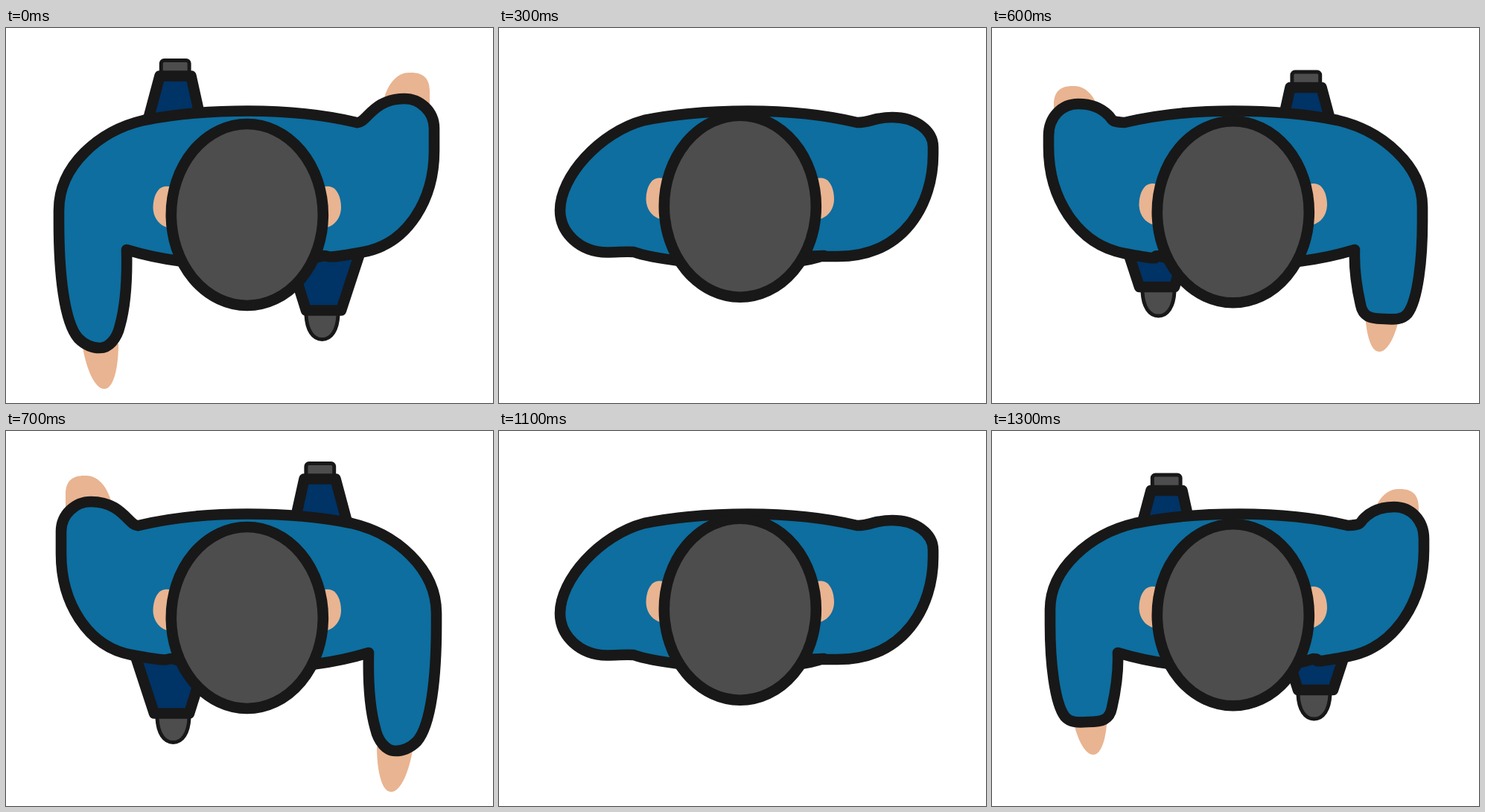
Recreate the animation shown at these times as an HTML page. Size 654x504 px, loop 1400 ms.

```html
<!DOCTYPE html>
<html lang="en">
<head>
<meta charset="utf-8">
<title>Walking figure from above</title>
<style>
  html, body { margin: 0; width: 100%; height: 100%; overflow: hidden; background: #fff; }
  svg { display: block; width: 100%; height: 100%; }
  .line { stroke: #181818; stroke-width: 14.6; stroke-linejoin: round; stroke-linecap: round; }
  .shoe { stroke: #181818; stroke-width: 5; fill: #4d4d4d; }
  .cloth { fill: #036; }
  .skin { fill: #e9b491; }
</style>
</head>
<body>
<svg viewBox="0 0 654 504">
  <g id="figure">
    <g id="backLeg">
      <rect class="shoe" x="208.3" y="43.5" width="37.8" height="28" rx="4"/>
      <path class="line cloth" d="M189 130L206.500 64.500H248.500L263 130"/>
    </g>
    <g id="frontLeg">
      <path class="shoe" d="M403 372V386C404 406 412 418.500 424.500 418.500C437 418.500 445 406 446 386V372"/>
      <path class="line cloth" d="M380 306L403 379.500H450L476 300"/>
    </g>
    <path id="upperHand" class="skin" d="M506 102C511 76 525 60 541 60C560 59 569 67 569 85V112Z"/>
    <path id="lowerHand" class="skin" d="M102 424C107 455 118 485 132 485C145 485 151 455 151 424Z"/>
    <path id="body" class="line" fill="#0d6e9f"/>
  </g>
  <g id="head">
    <path id="ear" class="skin" d="M222 214C205 208 197.500 225 197.500 242C198 257 208 268 222 269Z"/>
    <use href="#ear" transform="translate(647.500 0) scale(-1 1)"/>
    <ellipse class="line" cx="323.800" cy="251" rx="102" ry="122" fill="#4d4d4d"/>
  </g>
</svg>
<script>
const WIDTH = 649, STEP = 100, STEPS = 14;
const BACK = 'M185 124C230 115 280 111.500 325 111.500C375 111.500 425 116 471 127';
const FRONT = 'S440 306 425 306C385 320 300 321 235 313.500';

// From full stride to arms almost level; offsets are [x, y].
const poses = [
  {
    upper: 'C484 129 492 95 535 95C556 95 575 112 575 135V165C575 230 540 290 480 301',
    lower: 'C208 310 185 305 162 298C163 340 160 375 153 400C149 418 138 430 126 430' +
           'C115 430 105 425 97 417C78 395 71 330 71 260V245C71 185 125 138 185 124Z',
    backLeg: [0, 0], frontLeg: [0, 0], upperHand: [0, 0], lowerHand: [0, 0], head: 0, shift: 0
  },
  {
    upper: 'C492 126 486 123 493 117C503 107 515 102 533 102C556 102 573 120 573 145V160C573 228 535 291 471 303',
    lower: 'C208 310 185 305 162 298C163 325 159 350 154 372C151 388 141 391 122 391' +
           'C108 392 98 392 91 384C77 366 71 310 71 260V240C71 185 125 138 185 124Z',
    backLeg: [0, 15.5], frontLeg: [1, -31.5], upperHand: [-3, 18], lowerHand: [-3, -50], head: -3.7, shift: 7
  },
  {
    upper: 'C489 127 500 112 529 112C552 111 565 125 569 145C571 155 571.500 165 571.500 175C571.500 235 535 295 465 304',
    lower: 'C208 310 185 306 162 300C154 303 153 340 124 342C107 343 98 337 93 332' +
           'C80 318 72 285 72 250C72 195 120 145 185 124Z',
    backLeg: [0, 40], frontLeg: [0, -55.5], upperHand: [-3, 36], lowerHand: [-8, -115], head: -7.3, shift: 18
  },
  {
    upper: 'C490 127 493 120 518 120C550 120 573 138 573 160V170C573 235 535 307 445 307',
    lower: 'C208 310 185 306 171 301C160 300 150 301.500 135 301.500C98 301 72 275 72 245C72 200 125 140 185 124Z',
    backLeg: [0, 90], frontLeg: [0, -120], upperHand: [-6, 70], lowerHand: [0, -190], head: -11.3, shift: 10
  }
];

const parts = ['backLeg', 'frontLeg', 'upperHand', 'lowerHand'];
const el = id => document.getElementById(id);
const move = (id, x, y) => el(id).setAttribute('transform', `translate(${x} ${y})`);

function draw(time) {
  const step = Math.floor(time / STEP) % STEPS;
  const swing = Math.min(step, STEPS - step);
  const mirrored = swing > 3;
  const pose = poses[mirrored ? 7 - swing : swing];

  for (const id of parts) move(id, ...pose[id]);
  move('head', 0, pose.head);
  el('body').setAttribute('d', BACK + pose.upper + FRONT + pose.lower);
  el('figure').setAttribute('transform',
    mirrored ? `translate(${WIDTH} 0) scale(-1 1)` : `translate(${pose.shift} 0)`);
}

let start;
function tick(now) {
  start ??= now;
  draw(Math.max(0, now - start));
  requestAnimationFrame(tick);
}
draw(0);
requestAnimationFrame(tick);
</script>
</body>
</html>
```
